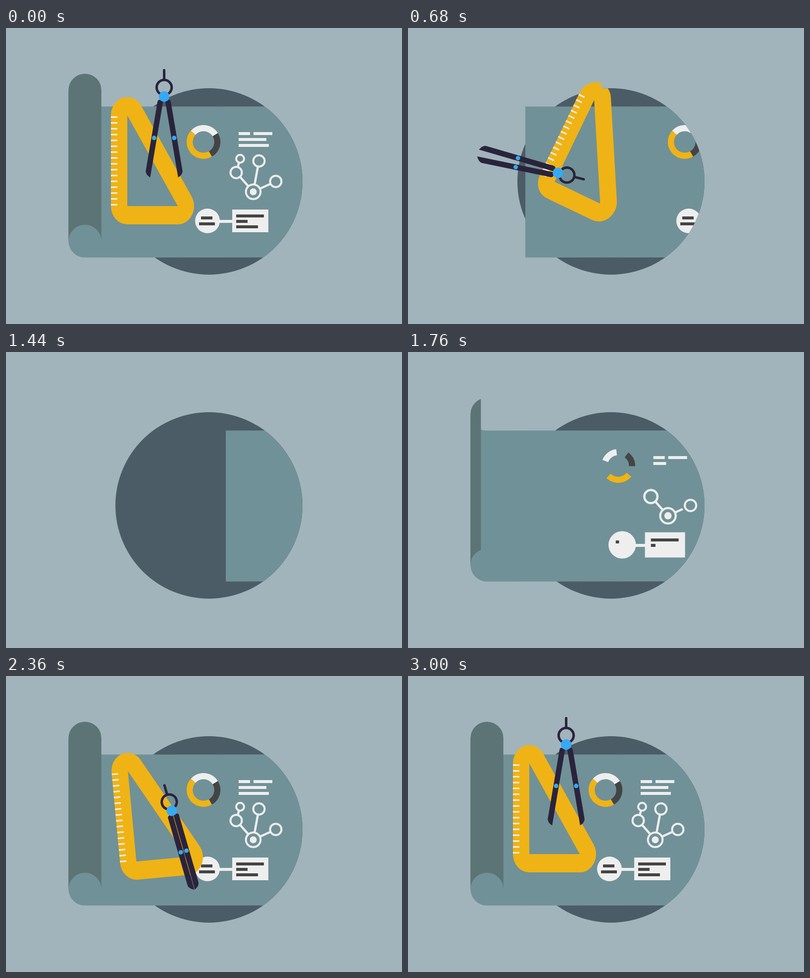
These frames come from a looping animation (800x600 px, 3.04 s). An HTML page with a canvas:

```html
<!DOCTYPE html>
<html lang="en">
<head>
<meta charset="utf-8">
<title>Blueprint</title>
<style>
  html, body { margin: 0; width: 100%; height: 100%; overflow: hidden; background: #a1b4bb; }
  canvas { display: block; }
</style>
</head>
<body>
<canvas width="800" height="600"></canvas>
<script>
const ctx = document.querySelector('canvas').getContext('2d');
const LOOP = 3040, TURN = 1300, RAD = Math.PI / 180;
const C = {
  back: '#a1b4bb', disc: '#4c5c66', paper: '#709197', roll: '#5c7475',
  white: '#eeeeee', dark: '#444444', yellow: '#efb315', navy: '#2a233c', blue: '#36a9f4'
};
const ROLL = { x: 159.5, top: 126, bottom: 432, r: 33.3 };

// Rows: time, x, y, degrees (and the opening of the legs for the compass)
const TRIANGLE = [
  [0, 347, 361, 0], [360, 347.3, 361, 1.6], [680, 388, 356, 25.6], [1000, 663, 343, 63],
  [1160, 860, 335, 80], [1900, 860, 335, 80], [2000, 640, 343, 60], [2120, 440, 356, 28],
  [2240, 376, 365, 2], [2360, 365, 366.5, -5.35], [2540, 350, 362, -1], [2720, 347, 361, 0]
];
const COMPASS = [
  [0, 319.5, 139, 0, 9.6], [360, 330, 182.5, 12, 9.2], [680, 303, 293.5, 104, 2.3],
  [1000, 676, 320, 87.7, 0], [1120, 761, 329, 88, 0], [1180, 800, 330, 88, 0],
  [1920, 800, 330, 88, 0], [2040, 600, 328, 90, 0], [2160, 360, 326, 85, 0],
  [2250, 340, 328, 15, 0], [2360, 335, 273.5, -16.1, 0], [2520, 327, 196, -9, 3],
  [2720, 320.5, 146, -1, 9], [2880, 319.5, 139, 0, 9.6]
];

let now = 0;
const clamp = v => Math.max(0, Math.min(1, v));

// Monotone cubic interpolation
function sample(track, t) {
  const last = track.length - 1;
  if (t >= track[last][0]) return track[last].slice(1);
  const i = track.findIndex((row, k) => t < track[k + 1][0]);
  const slope = (k, c) => (track[k + 1][c] - track[k][c]) / (track[k + 1][0] - track[k][0]);
  const tangent = (k, c) => {
    if (k === 0 || k === last) return 0;
    const a = slope(k - 1, c), b = slope(k, c);
    return a * b > 0 ? 2 * a * b / (a + b) : 0;
  };
  const [p, q] = [track[i], track[i + 1]], span = q[0] - p[0], u = (t - p[0]) / span;
  const blend = u * u * (3 - 2 * u);
  return p.slice(1).map((v, k) => v + (q[k + 1] - v) * blend +
    span * u * (1 - u) * ((1 - u) * tangent(i, k + 1) - u * tangent(i + 1, k + 1)));
}

function ramp(x, points) {
  const i = Math.max(1, points.findIndex(p => x <= p[0]));
  const [a, b] = [points[i - 1], points[i]];
  return a[1] + (b[1] - a[1]) * (x - a[0]) / (b[0] - a[0]);
}

const grow = (start, duration = 100) => now < TURN ? 1 : clamp((now - start) / duration);

function pop(start) {
  const v = grow(start, 280) - 1;
  return Math.max(0, 1 + 3.2 * v ** 3 + 2.2 * v * v);
}

function disc(x, y, r, color) {
  ctx.fillStyle = color;
  ctx.beginPath();
  ctx.arc(x, y, r, 0, 7);
  ctx.fill();
}

function arc(x, y, r, width, color, from = 0, to = 2 * Math.PI) {
  ctx.strokeStyle = color;
  ctx.lineWidth = width;
  ctx.beginPath();
  ctx.arc(x, y, r, from, to);
  ctx.stroke();
}

function line(x1, y1, x2, y2, width, color) {
  ctx.strokeStyle = color;
  ctx.lineWidth = width;
  ctx.beginPath();
  ctx.moveTo(x1, y1);
  ctx.lineTo(x2, y2);
  ctx.stroke();
}

function bar(x, y, width, color, start) {
  ctx.fillStyle = color;
  ctx.fillRect(x, y, width * grow(start), 6);
}

function clipped(x, width, draw) {
  ctx.save();
  ctx.beginPath();
  ctx.rect(x, 0, Math.max(0, width), 600);
  ctx.clip();
  draw();
  ctx.restore();
}

function paperShift() {
  return now < TURN ? 12.5 * (now / 360) ** 4 : 523 * (1 - clamp((now - 1380) / 720)) ** 4;
}

function drawPaper(shift) {
  const { x, top, bottom, r } = ROLL, P = Math.PI;
  const unrolled = shift < 82 ? ramp(shift, [[0, 0], [26, .627], [73, 1.27], [82, 1.5]]) : 1.5;
  const edge = shift < 82 ? x + r * Math.cos(P * unrolled) : 77 + shift;

  clipped(unrolled > 1 ? edge : 0, 800, () => {
    ctx.fillStyle = C.paper;
    ctx.beginPath();
    ctx.moveTo(700, 159);
    ctx.arc(x, top, r, P / 2, P);
    ctx.arc(x, bottom, r, P, P / 2, true);
    ctx.lineTo(700, 465);
    ctx.fill();
  });
  if (unrolled < 1) clipped(0, edge, () => {
    ctx.fillStyle = C.roll;
    ctx.beginPath();
    ctx.arc(x, top, r, P, 2 * P);
    ctx.arc(x, bottom, r, 2 * P, P, true);
    ctx.fill();
  });
}

function drawDonut() {
  const u = grow(1560, 360), p = u * u * (3 - 2 * u);
  for (const [from, span, color] of [[60, 162, C.yellow], [222, 106, C.white], [328, 92, C.dark]]) {
    const a = from - 51 * (1 - p);
    if (p) arc(399, 231, 28, 12.4, color, a * RAD, (a + span * p) * RAD);
  }
}

function drawText() {
  bar(470, 211, 23, C.white, 1580);
  bar(500, 211, 38, C.white, 1640);
  bar(470, 223, 56, C.white, 1715);
  bar(470, 235, 61, C.white, 1780);
}

function drawNetwork() {
  const hub = { x: 499.5, y: 332, r: 14.8, start: 1533 };
  const a = { x: 465, y: 293, r: 11.5, start: 1609 };
  const b = { x: 511, y: 269.5, r: 11.5, start: 1790 };
  const c = { x: 545, y: 311, r: 11.5, start: 1672 };
  const d = { x: 473, y: 265, r: 8, start: 1800 };
  const link = (m, n, start) => {
    const dx = n.x - m.x, dy = n.y - m.y, length = Math.hypot(dx, dy);
    const from = m.r / length, to = from + (1 - n.r / length - from) * grow(start, 120);
    if (to > from) line(m.x + dx * from, m.y + dy * from, m.x + dx * to, m.y + dy * to, 4.5, C.white);
  };
  link(hub, a, 1570);
  link(hub, c, 1670);
  link(hub, b, 1765);
  link(a, d, 1770);
  for (const n of [hub, a, b, c, d]) {
    const k = pop(n.start);
    if (k) arc(n.x, n.y, n.r * k, 4 * k, C.white);
  }
  disc(hub.x, hub.y, 7 * pop(hub.start), C.white);
}

function drawLabels() {
  const k = pop(1564);
  bar(431, 389, 27, C.white, 1600);
  disc(407, 391, 25 * k, C.white);
  ctx.fillStyle = C.white;
  ctx.fillRect(493.5 - 36.5 * k, 391 - 23 * k, 73 * k, 46 * k);
  bar(394, 382, 23, C.dark, 1732);
  bar(390, 394, 32, C.dark, 1790);
  bar(465, 378, 56, C.dark, 1650);
  bar(465, 389, 23, C.dark, 1721);
  bar(465, 400, 44, C.dark, 1780);
}

// Origin is the lower right corner of the hole
function drawTriangle() {
  const [x, y, angle] = sample(TRIANGLE, now), rx = 33, ry = 37, P = Math.PI, n = -31.9 * RAD;
  ctx.save();
  ctx.translate(x, y);
  ctx.rotate(angle * RAD);
  ctx.fillStyle = C.yellow;
  ctx.beginPath();
  ctx.ellipse(-102, -184, rx, ry, 0, -P, n);
  ctx.ellipse(0, 0, rx, ry, 0, n, P / 2);
  ctx.ellipse(-102, 0, rx, ry, 0, P / 2, P);
  ctx.closePath();
  ctx.moveTo(-102, -184);
  ctx.lineTo(0, 0);
  ctx.lineTo(-102, 0);
  ctx.closePath();
  ctx.fill('evenodd');
  ctx.fillStyle = C.white;
  for (let i = 0; i < 16; i++) ctx.fillRect(-135, -182 + i * 11.85, 13, 3);
  ctx.restore();
}

function drawLeg(side, opening) {
  ctx.save();
  ctx.scale(side, 1);
  ctx.rotate(-opening * RAD);
  ctx.fillStyle = C.navy;
  ctx.beginPath();
  ctx.moveTo(.5, 8);
  ctx.lineTo(7, 8);
  ctx.quadraticCurveTo(11.5, 8, 11.5, 13);
  ctx.lineTo(11.5, 155);
  ctx.quadraticCurveTo(10.5, 162, .5, 166.5);
  ctx.fill();
  disc(6, 86, 4.5, C.blue);
  ctx.restore();
}

// Origin is the hinge
function drawCompass() {
  const [x, y, angle, opening] = sample(COMPASS, now);
  ctx.save();
  ctx.translate(x, y);
  ctx.rotate(angle * RAD);
  ctx.lineCap = 'round';
  line(0, -36, 0, -53.5, 5, C.navy);
  arc(0, -18.5, 15.2, 5, C.navy);
  drawLeg(-1, opening);
  drawLeg(1, opening);
  disc(0, 0, 10.7, C.blue);
  ctx.restore();
}

function draw(time) {
  now = time % LOOP;
  ctx.fillStyle = C.back;
  ctx.fillRect(0, 0, 800, 600);
  disc(410, 311, 189, C.disc);

  // Things may leave the disc on the left only
  ctx.save();
  ctx.beginPath();
  ctx.arc(410, 311, 189, 0, 2 * Math.PI);
  ctx.rect(0, 0, 391, 600);
  ctx.clip();
  const shift = paperShift();
  drawPaper(shift);
  ctx.save();
  ctx.translate(shift, 0);
  drawDonut();
  drawText();
  drawNetwork();
  drawLabels();
  ctx.restore();
  drawTriangle();
  drawCompass();
  ctx.restore();
}

const begin = performance.now();
function tick() {
  draw(performance.now() - begin);
  requestAnimationFrame(tick);
}
tick();
</script>
</body>
</html>
```
